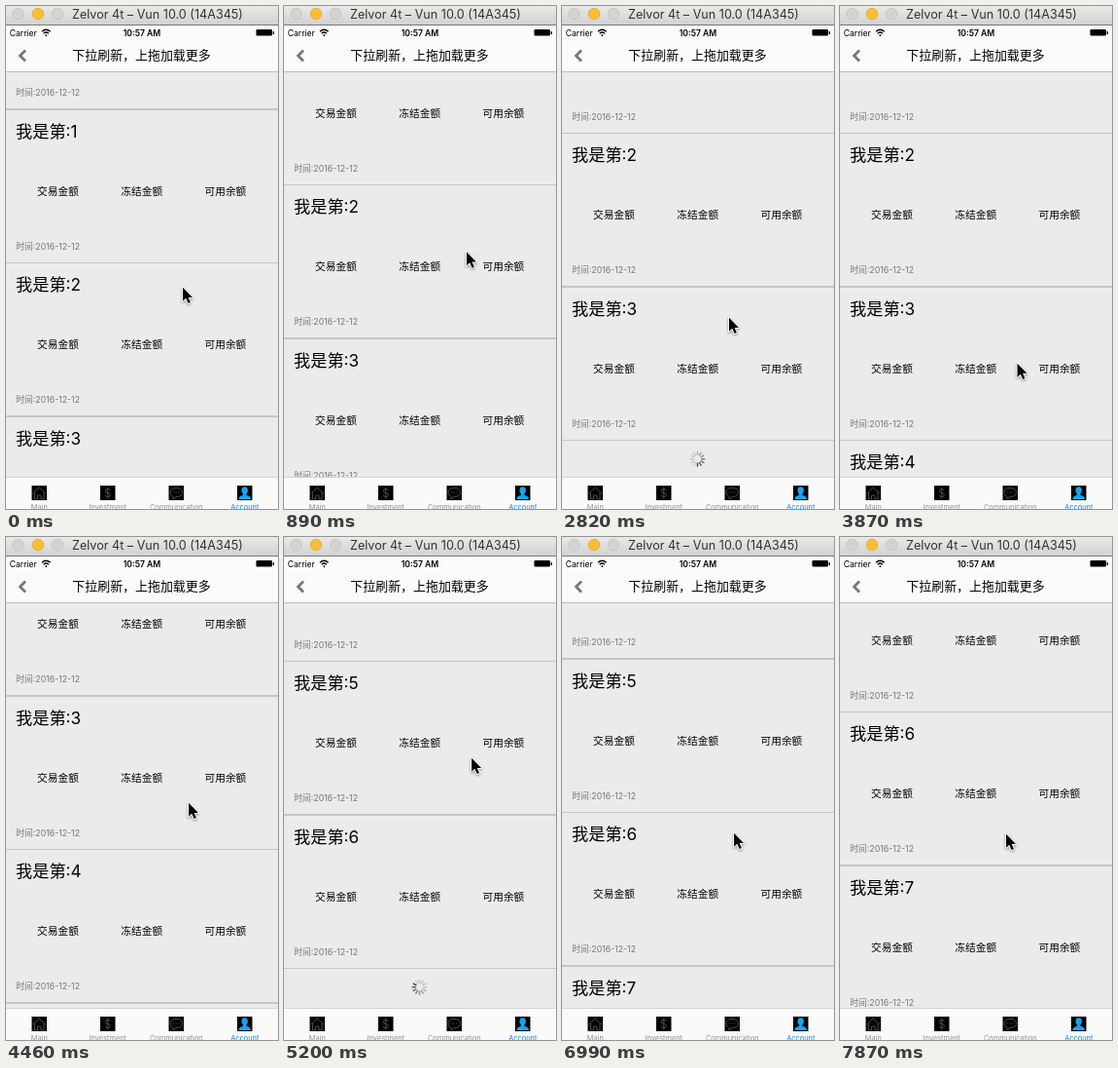
Write an HTML page that moves like this. It is 280 px wide and 516 px high and loops after 8 s.

```html
<!DOCTYPE html>
<html lang="zh">
<head>
<meta charset="utf-8">
<style>
  html, body { margin: 0; width: 100%; height: 100%; overflow: hidden; }
  svg { display: block; width: 280px; height: 516px; font-family: Inter, "Noto Sans CJK SC", "Noto Sans CJK", sans-serif; }
  .mid { text-anchor: middle; }
  .head { font-size: 17.2px; }
  .label { font-size: 10.7px; text-anchor: middle; }
  .date { font-size: 8.75px; fill: #777; }
  .tab { font-size: 7.4px; fill: #929292; text-anchor: middle; }
  .crisp { shape-rendering: crispEdges; }
  .line { fill: none; stroke: #555; stroke-width: .9; }
  #cursor { stroke: #fff; stroke-width: 2; stroke-linejoin: round; paint-order: stroke; filter: drop-shadow(0 1px 1px #0006); }
</style>
</head>
<body>
<svg viewBox="0 0 280 516">
  <defs>
    <linearGradient id="chrome" x2="0" y2="1">
      <stop stop-color="#e9e9e9"/><stop offset="1" stop-color="#d2d2d2"/>
    </linearGradient>
  </defs>
  <rect width="280" height="516" fill="#ebebeb"/>
  <g id="list"></g>
  <g id="spinner"></g>

  <g id="nav">
    <rect y="19" width="280" height="48" fill="#fbfbfb"/>
    <rect class="crisp" y="67" width="280" height="1" fill="#bdbdbd"/>
    <text x="3.7" y="30.6" font-size="8.6">Carrier</text>
    <path d="M37 26.2q4.3-4 8.6 0M38.7 28.2q2.6-2.3 5.2 0" fill="none" stroke="#000" stroke-width="1.3"/>
    <path d="M41.3 28.9l1.2 1.1-1.2 1.2-1.2-1.2z"/>
    <text class="mid" x="140" y="30.7" font-size="8.6" font-weight="600">10:57 AM</text>
    <rect x="257.5" y="24" width="16.5" height="6.5" rx="1.3"/>
    <rect x="274.7" y="26" width="1.3" height="3" rx=".6"/>
    <path d="M20 45.5L14.5 51l5.5 5.5" fill="none" stroke="#777" stroke-width="2.8"/>
    <text class="mid" x="139.5" y="55.2" font-size="12.95">下拉刷新，上拖加载更多</text>
  </g>

  <g id="window">
    <rect width="280" height="19" fill="url(#chrome)"/>
    <rect class="crisp" y="19" width="280" height="1" fill="#777"/>
    <g stroke-width=".7" fill="#d3d3d3" stroke="#bcbcbc">
      <circle cx="12.5" cy="8" r="5.8"/>
      <circle cx="33" cy="8" r="5.8" fill="#fdbd32" stroke="#dfa12c"/>
      <circle cx="53" cy="8" r="5.8"/>
    </g>
    <text x="68" y="12.8" font-size="12.6" fill="#333">Zelvor 4t – Vun 10.0 (14A345)</text>
  </g>

  <g id="tabs">
    <rect y="484" width="280" height="32" fill="#fafafa"/>
    <rect class="crisp" y="483" width="280" height="1" fill="#d4d4d4"/>
  </g>

  <path id="cursor" d="M.5 0v14l3.300-3 2.300 5.300 2.300-1-2.300-5.100h4.400z"/>
</svg>
<script>
const LOOP = 8000, STEP = 148.5, ROW = 157.5;
const $ = id => document.getElementById(id);
const markup = (count, draw) => Array.from({ length: count }, (_, i) => draw(i)).join("");

const tabs = {
  Main: '<path class="line" d="M1 8l6.700-6 6.700 6M3 7v7h3v-4h3.500v4h3V7"/>',
  Investment: '<path class="line" d="M10.300 5q-.5-1.600-2.500-1.600-2.500 0-2.500 2t2.500 2.100 2.500 2.100-2.500 2q-2.300 0-2.600-1.800M7.800 1.800v11.400"/>',
  Communication: '<path class="line" d="M4.500 11.500Q1.500 10 1.500 7q0-4.500 6.200-4.500T14 7q0 4.500-6.300 4.500L4.500 13.500zM4.500 7h1.200m1.400 0h1.200m1.400 0h1.200"/>',
  Account: '<path fill="#12a5f4" d="M7.700 1.300c4 0 4 5 1.800 7v1.400q4.500 1 4.500 4.300H1.500q0-3.300 4.500-4.300V8.300c-2.200-2-2.200-7 1.700-7z"/>'
};
$("tabs").innerHTML += Object.entries(tabs).map(([name, icon], i) => `
  <g transform="translate(${26.5 + 70.5 * i} 492)">
    <rect width="15.5" height="15"/>${icon}
    <text class="tab" x="7.8" y="25.3" ${name === "Account" ? 'style="fill:#1183f5"' : ""}>${name}</text>
  </g>`).join("");

const labels = ["交易金额", "冻结金额", "可用余额"];
$("list").innerHTML = markup(10, n => `<g>
  <rect class="crisp" width="280" height="1" fill="#c6c6c6"/>
  <text class="head" x="10" y="28.7">我是第:${n}</text>
  ${markup(3, i => `<text class="label" x="${53.5 + 86.2 * i}" y="88.3">${labels[i]}</text>`)}
  <text class="date" x="10.3" y="144.2">时间:2016-12-12</text>
  <rect class="crisp" y="157" width="280" height="1" fill="#c6c6c6"/>
</g>`);
$("spinner").innerHTML = markup(12, i =>
  `<path d="M0-4.200V-7.300" stroke="#333" stroke-width="1.5" stroke-linecap="round" transform="rotate(${i * 30})"/>`);
const rows = [...$("list").children], spokes = [...$("spinner").children];

const clamp = x => Math.min(1, Math.max(0, x));
const glide = x => x < .5 ? 4 * x ** 3 : 1 - 4 * (1 - x) ** 3;
const settle = x => 1 - (1 - x) ** 3;
const part = (time, start, end, ease = glide) => ease(clamp((time - start) / (end - start)));

// Each drag or flick adds its own distance; overshoot at the list's end springs back.
const listTop = t => 106
  - 160.5 * part(t, 300, 1485) + 27.5 * part(t, 1485, 2376, settle)
  - 504 * part(t, 4284, 4716) + 31.5 * part(t, 4716, 5600, settle)
  + 149.5 * part(t, 5800, 6247)
  - 155 * part(t, 6300, 6980) - 103 * part(t, 6980, 7870);

// Hand stops: time, x, y
const stops = [
  [0, 181, 288], [1485, 189, 239], [2376, 171, 319], [3480, 171, 319], [4160, 187, 390],
  [4455, 187, 272], [5800, 195, 200], [6088, 197, 321], [6980, 176, 303], [7870, 170, 304]
];
function hand(time) {
  const i = Math.max(1, stops.findIndex(stop => stop[0] >= time));
  const [start, x, y] = stops[i - 1], [end, toX, toY] = stops[i];
  const p = part(time, start, end);
  return [x + (toX - x) * p, y + (toY - y) * p];
}

const place = (element, x, y) => element.setAttribute("transform", `translate(${x} ${y})`);

function draw(elapsed) {
  const step = Math.min(53, Math.floor(elapsed / STEP + .02));
  const time = Math.min(7870, step * STEP);
  const top = listTop(time);
  const loaded = time < 3260 ? 3 : time < 6600 ? 6 : 9;
  rows.forEach((row, n) => {
    place(row, 0, Math.floor(top + (n - 1) * ROW + .05));
    row.style.display = n > loaded ? "none" : "";
  });
  place($("spinner"), 139.5, top + loaded * ROW + 19.3);
  const lead = Math.floor((time + 1000) * .012 + .2);
  spokes.forEach((spoke, i) => {
    spoke.style.opacity = Math.max(.2, .85 - (lead + 8 - i) % 12 * .09);
  });
  const [x, y] = hand(time);
  place($("cursor"), x + .5, y + .8);
}

const start = performance.now();
function tick() {
  draw((performance.now() - start) % LOOP);
  requestAnimationFrame(tick);
}
tick();
</script>
</body>
</html>
```
